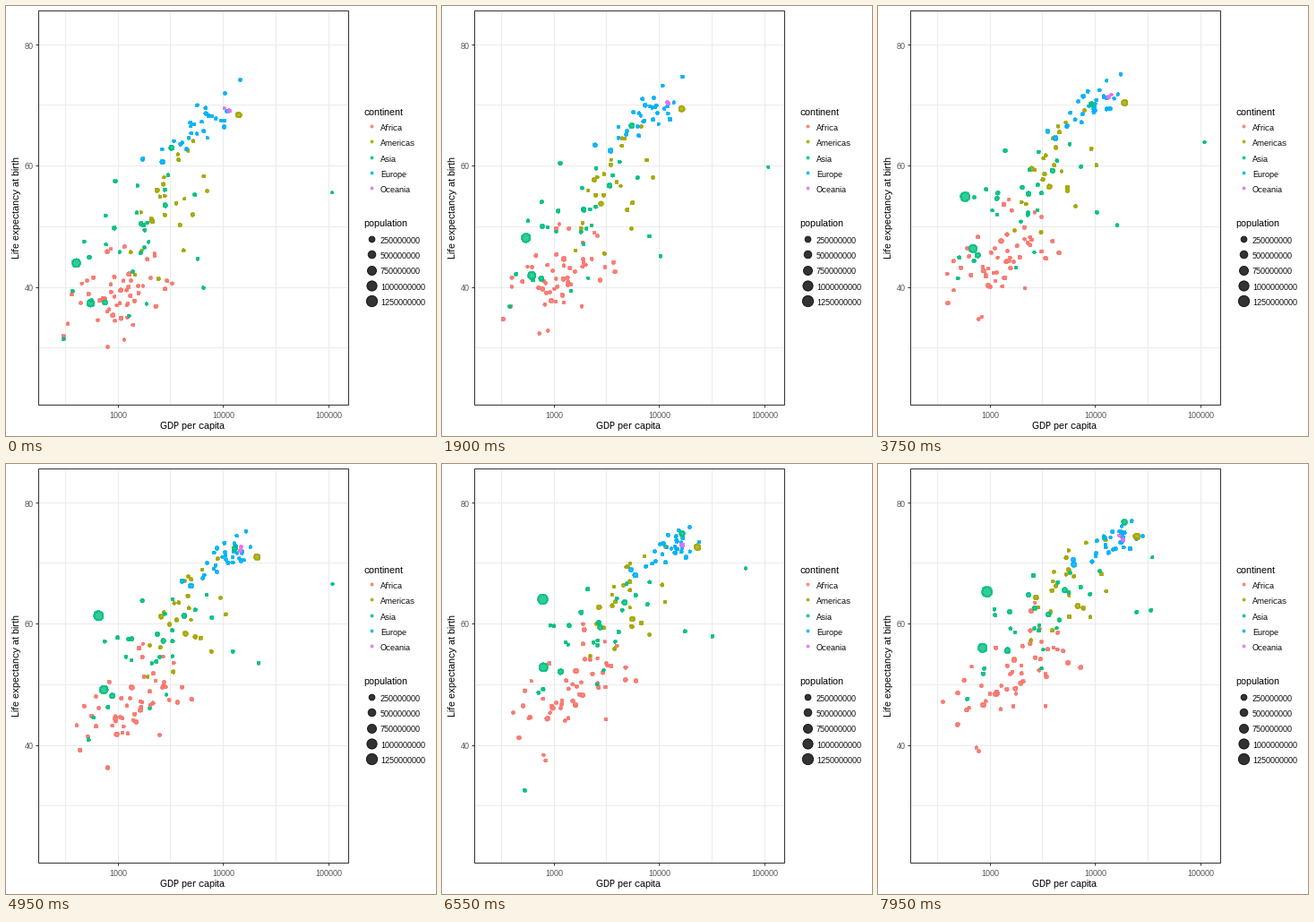
These frames come from a looping animation (480x480 px, 8000 ms). A matplotlib script:

```python
import numpy as np
import matplotlib.pyplot as plt
from matplotlib.animation import FuncAnimation
from matplotlib.colors import to_rgba
from matplotlib.patches import Rectangle

plt.rcParams.update({"font.family": "Liberation Sans",
                     "text.hinting": "native", "text.hinting_factor": 1})

SIZE, DPI = 480, 80
PX = 72 / DPI                 # points per pixel
FRAMES, INTERVAL = 160, 50
STEP = 300 / 11               # frames per five-year step
KNOTS = 7                     # one knot every five years
GROWTH = 1.018                # population growth per year
BLACK, DARK, GREY, GRID = "black", "#333333", "#4D4D4D", "#EBEBEB"

COLORS = {"Africa": "#F8766D", "Americas": "#A3A500", "Asia": "#00BF7D",
          "Europe": "#00B0F6", "Oceania": "#E76BF3"}

# count, then (log GDP, spread, life, slope, spread) at the first and last knot
CLOUD = {
    "Africa": (52, (2.99, 0.26, 39, 6, 4.3), (3.18, 0.34, 51.5, 9, 5)),
    "Americas": (23, (3.51, 0.2, 54, 20, 5.5), (3.74, 0.2, 66.5, 13, 4)),
    "Asia": (26, (3.1, 0.33, 47, 16, 6.5), (3.5, 0.45, 61.5, 10, 4.5)),
    "Europe": (30, (3.7, 0.25, 65.5, 10, 2), (4.14, 0.18, 73, 7, 1.3)),
    "Oceania": (2, (4.01, 0.01, 69.2, 0, 0.1), (4.26, 0.02, 74.2, 0, 0.4)),
}

# continent, population in millions, then key points (knot, GDP, life)
LEADERS = [
    ("Asia", 82, (0, 750, 37.5), (3, 762, 46), (6, 1517, 56.2)),
    ("Americas", 56, (0, 2109, 50.9), (6, 7031, 63.3)),
    ("Asia", 0.2, (0, 108382, 55.6), (4, 109347, 67.7), (6, 31354, 71.3)),
    ("Asia", 4.7, (0, 369, 39.4), (3, 523, 45.4), (5, 525, 31.2),
     (6, 624, 51)),
    ("Asia", 4, (0, 6460, 39.9), (5, 34168, 58.7), (6, 33693, 63)),
    ("Asia", 86, (0, 3217, 63), (4, 14779, 73.4), (6, 19384, 77.1)),
    ("Americas", 157, (0, 13990, 68.4), (4, 21806, 71.3), (6, 25010, 74.7)),
    ("Asia", 372, (0, 547, 37.4), (3, 701, 47.2), (6, 856, 56.6)),
    ("Asia", 556, (0, 400, 44), (1, 576, 50.5), (2, 488, 44.5),
     (3, 613, 58.4), (4, 677, 63.1), (6, 962, 65.5)),
]


def map_x(log_gdp):
    return 125.2 + 117.4 * (log_gdp - 3)


def map_y(life):
    return 314.05 - 6.775 * (life - 40)


def area(pop):
    """Marker area in square points for a population in millions."""
    size = 1 + 5 * np.sqrt(np.asarray(pop, float) / 1318.7)
    return (2.1 * size * PX) ** 2


def normal(rng, n):
    return np.clip(rng.normal(size=n), -1.9, 1.9)


def cloud_tracks(rng, n, first, last):
    z, e = normal(rng, n), normal(rng, n)
    ends = []
    for mean, spread, life, slope, noise in (first, last):
        ends.append((mean + spread * z, life + slope * spread * z + noise * e))
        z = np.clip(0.88 * z + 0.45 * normal(rng, n), -2, 2)
        e = np.clip(0.9 * e + 0.4 * normal(rng, n), -2, 2)
    gdp, life = (np.linspace(a, b, KNOTS, axis=1) for a, b in zip(*ends))
    gdp += rng.normal(0, 0.025, gdp.shape)
    life += rng.normal(0, 0.25, life.shape)
    pop = np.clip(np.exp(rng.normal(1.6, 1.2, n)), 0.2, 60)
    return np.maximum(gdp, 2.48), np.maximum(life, 29), pop


def leader_track(points):
    knots, gdp, life = np.transpose(points)
    steps = np.arange(KNOTS)
    return np.interp(steps, knots, np.log10(gdp)), np.interp(steps, knots, life)


def build():
    rng = np.random.default_rng(52)
    gdp, life, pops, colors = [], [], [], []
    for name, (n, first, last) in CLOUD.items():
        g, l, p = cloud_tracks(rng, n, first, last)
        gdp.extend(g)
        life.extend(l)
        pops.extend(p)
        colors += [COLORS[name]] * n
    for name, pop, *points in LEADERS:
        g, l = leader_track(points)
        gdp.append(g)
        life.append(l)
        pops.append(pop)
        colors.append(COLORS[name])
    return map_x(np.array(gdp)), map_y(np.array(life)), np.array(pops), colors


fig = plt.figure(figsize=(SIZE / DPI, SIZE / DPI), dpi=DPI, facecolor="white")
ax = fig.add_axes([0, 0, 1, 1])
ax.set(xlim=(0, SIZE), ylim=(SIZE, 0))
ax.axis("off")


def line(xs, ys, color, z):
    ax.plot(xs, ys, color=color, lw=PX, zorder=z, snap=False,
            solid_capstyle="butt")


def label(x, y, text, size=9, color=BLACK, ha="left"):
    ax.text(x, y, text, fontsize=size * PX, color=color, ha=ha,
            va="center_baseline")


def dots(x, y, s, colors, z):
    rgba = [to_rgba(c, 0.8) for c in colors]
    return ax.scatter(x, y, s=s, facecolors=rgba, edgecolors=rgba,
                      linewidths=PX, antialiased=False, zorder=z)


def draw_panel():
    left, top, right, bottom = 36.5, 5.5, 382.5, 445.5
    for log_gdp in np.arange(2.5, 5.1, 0.5):
        x = int(map_x(log_gdp)) + 0.5
        line([x, x], [top, bottom], GRID, 1)
        if log_gdp % 1 == 0:
            line([x, x], [bottom, bottom + 3], DARK, 4)
            label(x, 456, str(10 ** int(log_gdp)), color=GREY, ha="center")
    for life in range(30, 81, 10):
        y = int(map_y(life)) + 0.5
        line([left, right], [y, y], GRID, 1)
        if life % 20 == 0:
            line([left - 3, left], [y, y], DARK, 4)
            label(31, y + 0.5, str(life), color=GREY, ha="right")
    ax.add_patch(Rectangle((left, top), right - left, bottom - top, fill=False,
                           ec=DARK, lw=PX, zorder=4, snap=False))
    label(208, 468.5, "GDP per capita", 11, ha="center")
    ax.text(12, 225.5, "Life expectancy at birth", fontsize=11 * PX,
            rotation=90, ha="center", va="center")


def draw_legend():
    label(399.5, 118.5, "continent", 11)
    for i, (name, color) in enumerate(COLORS.items()):
        y = 134.2 + 17.28 * i
        dots([408], [y], (3 * PX) ** 2, [color], 5)
        label(418, y + 1.3, name)
    label(399.5, 242.5, "population", 11)
    for i in range(1, 6):
        y = 242.7 + 17.28 * i
        dots([408], [y], area(250 * i), [BLACK], 5)
        label(418, y + 1.3, str(250_000_000 * i))


draw_panel()
draw_legend()
xs, ys, pops, colors = build()
points = dots(xs[:, 0], ys[:, 0], area(pops), colors, 3)


def update(frame):
    k, t = divmod(frame / STEP, 1)
    k = int(k)
    x = xs[:, k] + (xs[:, k + 1] - xs[:, k]) * t
    y = ys[:, k] + (ys[:, k + 1] - ys[:, k]) * t
    points.set_offsets(np.column_stack([x, y]))
    points.set_sizes(area(pops * GROWTH ** (5 * frame / STEP)))
    return (points,)


anim = FuncAnimation(fig, update, frames=FRAMES, interval=INTERVAL,
                     repeat=True, repeat_delay=0, blit=False)
plt.show()
```
